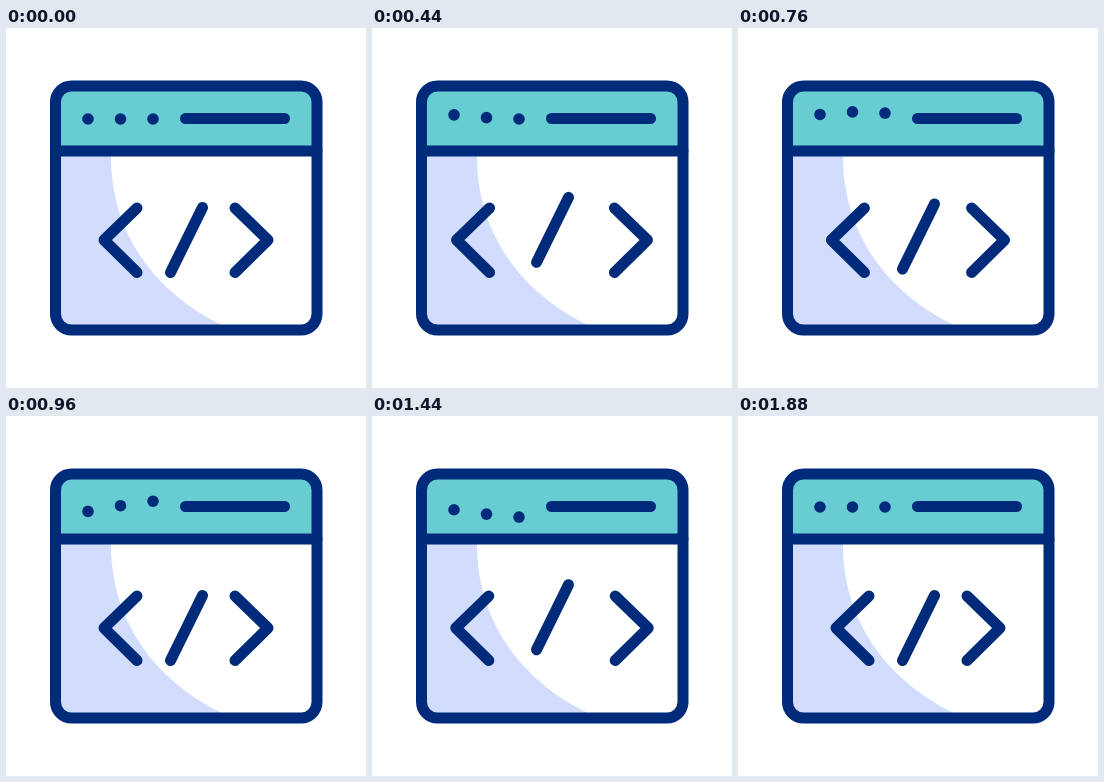
An HTML page for the animation above (1.92 s loop, 360 px wide and 360 px high).

```html
<!DOCTYPE html>
<html lang="en">
<head>
<meta charset="utf-8">
<title>Code window</title>
<style>
  html, body { margin: 0; width: 100%; height: 100%; overflow: hidden; background: #fff; }
  svg { display: block; width: 100vw; height: 100vh; }
  .line { fill: none; stroke: #002a7a; stroke-width: 11; stroke-linecap: round; stroke-linejoin: round; }
  .dot { fill: #002a7a; }
</style>
</head>
<body>
<svg viewBox="0 0 360 360">
  <path fill="#d2dcfd" d="M50 123H105V129C105 205 149 264 214 296V302H66Q50 302 50 286Z"/>
  <path fill="#68cdd2" d="M50 123V74Q50 58 66 58H295Q311 58 311 74V123Z"/>
  <rect class="line" x="49.5" y="58" width="261.5" height="244" rx="16"/>
  <path class="line" d="M50 123H311M179.5 90.5H278.5"/>
  <circle class="dot" cx="82" cy="91" r="5.8"/>
  <circle class="dot" cx="114.5" cy="91" r="5.8"/>
  <circle class="dot" cx="147" cy="91" r="5.8"/>
  <path class="line" id="left" d="M131 180L98 212L131 244.5"/>
  <path class="line" id="slash" d="M196.5 179.5L164.5 244.5"/>
  <path class="line" id="right" d="M229 180L262 212L229 244.5"/>
</svg>
<script>
  const LOOP = 1920, STEP = 40, STAGGER = 120;
  const spread = [[70, 0], [505, 1], [915, 0], [965, 0], [1420, 1], [1860, 0]];
  const bounce = [[200, 0], [630, -7.1], [1170, 10.2], [1580, 0]];
  const left = document.getElementById('left');
  const right = document.getElementById('right');
  const slash = document.getElementById('slash');
  const dots = document.querySelectorAll('.dot');

  const smooth = u => u * u * (3 - 2 * u);

  // Eased value of a list of [time, value] keys
  function valueAt(keys, t) {
    if (t <= keys[0][0]) return keys[0][1];
    for (let i = 1; i < keys.length; i++) {
      const [t0, v0] = keys[i - 1], [t1, v1] = keys[i];
      if (t < t1) return v0 + (v1 - v0) * smooth((t - t0) / (t1 - t0));
    }
    return keys[keys.length - 1][1];
  }

  function move(el, x, y) {
    el.setAttribute('transform', `translate(${x.toFixed(2)} ${y.toFixed(2)})`);
  }

  function draw(t) {
    const s = valueAt(spread, t);
    move(left, -14.3 * s, 0);
    move(right, 14.3 * s, 0);
    move(slash, 0, -10.8 * s);
    dots.forEach((dot, i) => move(dot, 0, valueAt(bounce, t - i * STAGGER)));
  }

  const start = performance.now();
  function tick() {
    const t = (performance.now() - start) % LOOP;
    draw(Math.floor(t / STEP) * STEP);
    requestAnimationFrame(tick);
  }
  tick();
</script>
</body>
</html>
```
